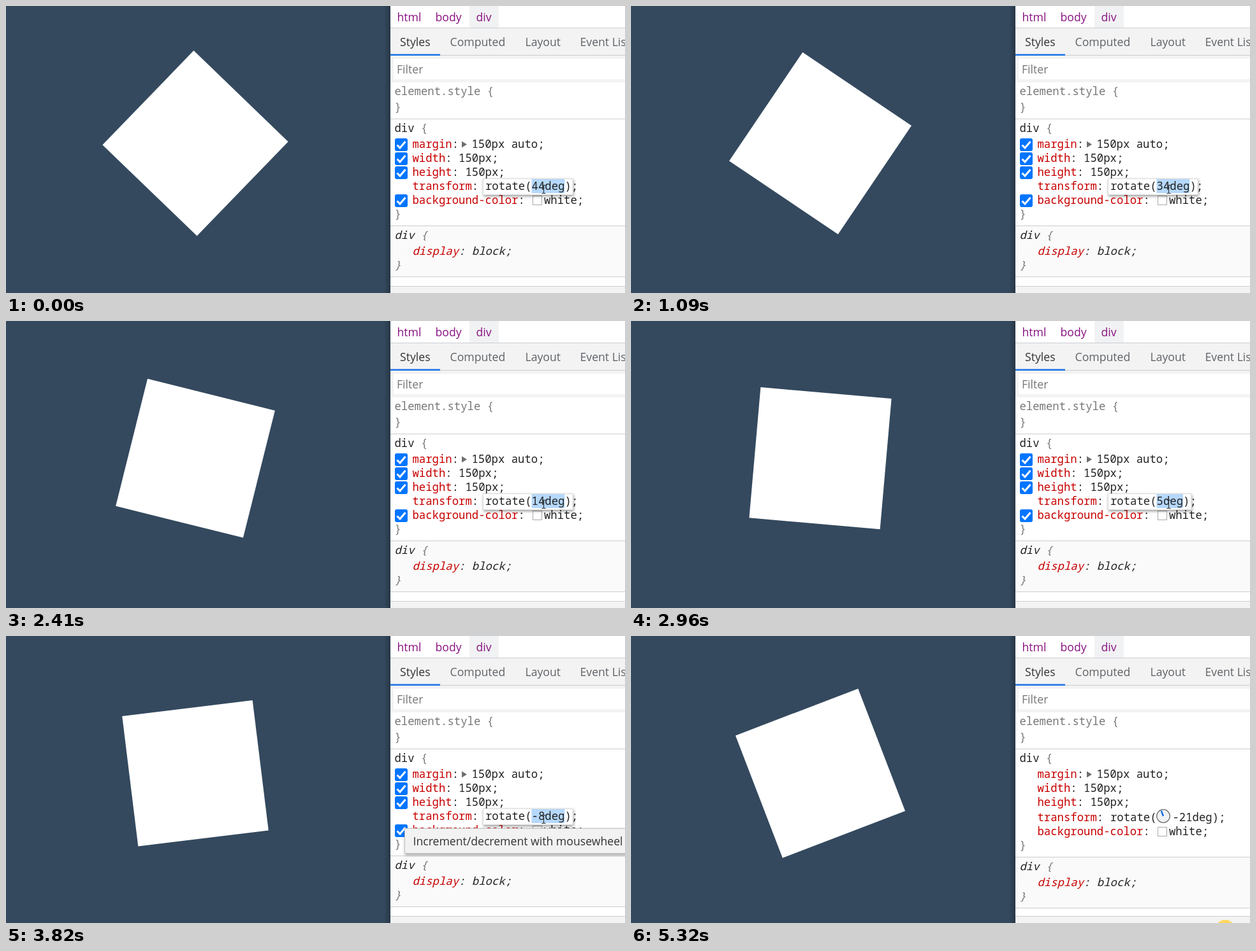
An HTML page that plays this animation: 971x451 px, repeating every 5400 ms.

```html
<!DOCTYPE html>
<html lang="en">
<head>
<meta charset="utf-8">
<title>Rotate with the mouse wheel</title>
<style>
  html, body { margin: 0; width: 100%; height: 100%; overflow: hidden; background: #34495e; }
  svg { display: block; width: 971px; height: 451px; }
  text { white-space: pre; }
  .ui { font: 17.65px "Open Sans", "Noto Sans", sans-serif; fill: #5f6368; }
  .code { font: 17.3px "Noto Sans Mono", "DejaVu Sans Mono", monospace; fill: #222; }
  .tag { fill: #881280; }
  .prop { fill: #c80000; }
  .dim { fill: #777; }
  .dark { fill: #333; }
  .line { fill: #cacdd1; }
  .italic { font-style: italic; }
</style>
</head>
<body>
<svg viewBox="0 0 971 451">
  <defs>
    <filter id="shadow" x="-10%" y="-40%" width="120%" height="200%">
      <feDropShadow dx="1" dy="2" stdDeviation="2" flood-opacity=".4"/>
    </filter>
    <linearGradient id="edge"><stop stop-opacity="0"/><stop offset="1" stop-opacity=".25"/></linearGradient>
    <g id="check">
      <rect width="20" height="20" rx="3" fill="#0075ff"/>
      <path d="M3.5 10.5l4.5 4.5 8.5-10" fill="none" stroke="#fff" stroke-width="3"/>
    </g>
  </defs>

  <rect width="971" height="451" fill="#34495e"/>
  <rect id="square" x="-103" y="-103" width="206" height="206" fill="#fff"/>

  <!-- toolbar -->
  <rect x="593" width="10" height="451" fill="url(#edge)"/>
  <rect x="603" width="368" height="451" fill="#fff"/>
  <rect x="727" width="46" height="34" fill="#f1f2f4"/>
  <rect x="603" y="35" width="368" height="85" fill="#f3f3f3"/>
  <rect x="608" y="83" width="363" height="32" fill="#fff"/>
  <rect class="line" x="603" y="34" width="368" height="1"/>
  <rect class="line" x="603" y="77" width="368" height="1"/>
  <rect x="603" y="75.5" width="78" height="2.5" fill="#1a73e8"/>
  <g class="ui">
    <text class="tag" x="613.5" y="24">html</text>
    <text class="tag" x="673.5" y="24">body</text>
    <text class="tag" x="737.5" y="24">div</text>
    <text class="dark" x="618" y="63">Styles</text>
    <text x="696.5" y="63">Computed</text>
    <text x="814.5" y="63">Layout</text>
    <text x="900.5" y="63">Event Listeners</text>
    <text class="dim" x="613" y="106">Filter</text>
  </g>

  <!-- style rules -->
  <g class="code">
    <text class="dim" x="609.5" y="140">element.style {</text>
    <text class="dim" x="609.5" y="165">}</text>
    <rect class="line" x="603" y="177" width="368" height="1"/>
    <text x="609.5" y="198">div <tspan class="dim">{</tspan></text>
    <text x="637.5" y="223"><tspan class="prop">margin</tspan>:</text>
    <path d="M715 212.5v10l8-5z" fill="#6e6e6e"/>
    <text x="730.5" y="223">150px auto;</text>
    <text x="637.5" y="245"><tspan class="prop">width</tspan>: 150px;</text>
    <text x="637.5" y="267"><tspan class="prop">height</tspan>: 150px;</text>
    <g id="lower">
      <rect x="603" y="346" width="368" height="80" fill="#fafafa"/>
      <rect class="line" x="603" y="345" width="368" height="1"/>
      <rect class="line" x="603" y="425" width="368" height="1"/>
      <text x="637.5" y="289"><tspan class="prop">transform</tspan>:</text>
      <text x="637.5" y="311"><tspan class="prop">background-color</tspan>:</text>
      <rect x="826.5" y="298.5" width="14" height="14" fill="#fff" stroke="#aaa"/>
      <text x="844" y="311">white;</text>
      <text class="dim" x="609.5" y="333">}</text>
      <text class="italic" x="609.5" y="366">div <tspan class="dim">{</tspan></text>
      <text class="italic" x="637.5" y="391"><tspan class="prop">display</tspan>: block;</text>
      <text class="italic dim" x="609.5" y="413">}</text>
    </g>
    <rect x="603" y="441" width="368" height="10" fill="#f3f3f3"/>
    <rect class="line" x="603" y="440" width="368" height="1"/>

    <g id="checks">
      <use href="#check" x="610" y="208"/>
      <use href="#check" x="610" y="230"/>
      <use href="#check" x="610" y="252"/>
      <use href="#check" x="610" y="296"/>
    </g>

    <g id="editor">
      <rect id="field" x="748.5" y="271.5" height="25" fill="#fff" stroke="#ddd" filter="url(#shadow)"/>
      <rect id="selection" x="824.5" y="272" height="22" fill="#b5d8fc"/>
      <text id="value" x="752" y="289"></text>
    </g>

    <g id="committed">
      <text x="752" y="291">rotate(</text>
      <circle cx="835" cy="283" r="10.3" fill="#f0f1f3" stroke="#6e6e6e" stroke-width="1.3"/>
      <path d="M835 283v-9" transform="rotate(-21 835 283)" stroke="#1a73e8" stroke-width="2.6"/>
      <text x="849.5" y="291">-21deg);</text>
      <circle cx="932" cy="462" r="16" fill="#ffd75e"/>
    </g>
  </g>

  <g id="tooltip">
    <rect x="625.5" y="302.5" width="360" height="39" fill="#f2f2f2" stroke="#c4c4c4" filter="url(#shadow)"/>
    <text class="ui dark" x="638.5" y="329">Increment/decrement with mousewheel</text>
  </g>
  <path id="cursor" d="M-3 -6.5h2l1 1 1 -1h2M0 -5.5v11M-3 6.5h2l1 -1 1 1h2" fill="none" stroke="#333" stroke-width="1.2"/>
</svg>

<script>
const LOOP = 5400, CHAR = 10.38;
const TOOLTIP_AT = 3540, LEAVE_AT = 4840, COMMIT_AT = 5320;

// Wheel bursts: first step, last step, step count, resulting angle.
const BURSTS = [
  [400, 480, 2, 41], [710, 780, 2, 38], [1020, 1090, 2, 34],
  [1330, 1410, 2, 30], [1560, 1640, 2, 26], [1780, 1940, 3, 22],
  [2110, 2180, 2, 17], [2410, 2410, 1, 14], [2640, 2710, 2, 9],
  [2890, 2960, 2, 5], [3190, 3360, 3, 0], [3540, 3590, 2, -4],
  [3820, 3900, 2, -8], [4070, 4140, 2, -13], [4290, 4450, 3, -18],
  [4620, 4680, 2, -21]
];
const PROGRESS = { 1: [1], 2: [.75, 1], 3: [.35, .8, 1] };
const EXIT_PATH = [[868, 325], [897, 380], [915, 430]];

const el = Object.fromEntries([...document.querySelectorAll("svg > [id], svg g [id]")].map(n => [n.id, n]));
const show = (node, on) => node.setAttribute("visibility", on ? "visible" : "hidden");
const move = (node, x, y, rest = "") => node.setAttribute("transform", `translate(${x} ${y})${rest}`);

// The typed value runs slightly ahead of the square.
function pose(t) {
  let angle = 44, label = 44;
  for (const [start, end, count, target] of BURSTS) {
    if (t < start) break;
    const step = count > 1 ? Math.floor((t - start) / (end - start) * (count - 1)) : 0;
    const done = PROGRESS[count][Math.min(step, count - 1)];
    const delta = target - angle;
    label = Math.round(angle + delta * Math.min(1, done + .25));
    angle += delta * done;
  }
  return { angle, label };
}

function draw(t) {
  const { angle, label } = pose(t);
  const committed = t >= COMMIT_AT;
  move(el.square, 297, 215.7, ` rotate(${angle})`);

  const selected = `${label}deg`;
  el.value.textContent = `rotate(${selected});`;
  el.selection.setAttribute("width", selected.length * CHAR);
  el.field.setAttribute("width", (selected.length + 8) * CHAR + 5.5);

  const exitStep = Math.floor((t - LEAVE_AT) / 80);
  const [x, y] = exitStep < 0 ? [843.5, 288] : EXIT_PATH[exitStep] || [932, 470];
  move(el.cursor, x, y);
  show(el.cursor, y < 451);
  show(el.checks, y < 346);
  show(el.tooltip, t >= TOOLTIP_AT && t < LEAVE_AT);
  show(el.editor, !committed);
  show(el.committed, committed);
  move(el.lower, 0, committed ? 2 : 0);
}

function frame() {
  draw(performance.now() % LOOP);
  requestAnimationFrame(frame);
}
frame();
</script>
</body>
</html>
```
